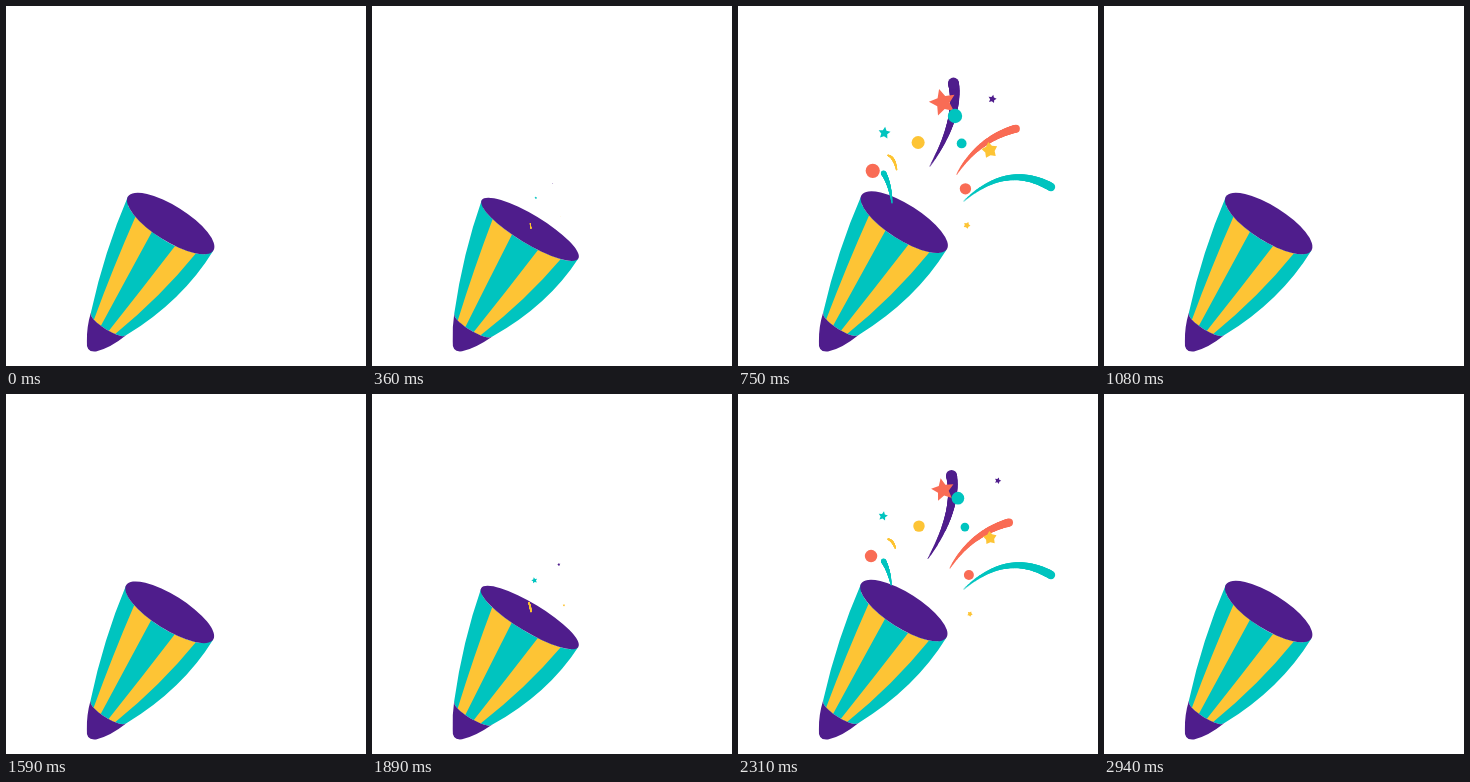
Recreate the animation shown at these times as an HTML page with a canvas. Size 360 by 360 pixels, loop 2.97 s.

```html
<!DOCTYPE html>
<html>
<head>
<meta charset="utf-8">
<style>
html, body { margin: 0; height: 100%; overflow: hidden; background: #fff; }
canvas { display: block; width: 360px; height: 360px; }
</style>
</head>
<body>
<canvas id="stage" width="360" height="360"></canvas>
<script>
const ctx = document.getElementById('stage').getContext('2d');
const LOOP = 2970, POP = LOOP / 2;
const TEAL = '#00c4bf', YELLOW = '#fdc435', RED = '#f96c55', PURPLE = '#4f1d8c';

const clamp = x => Math.max(0, Math.min(1, x));
const span = (t, a, b) => clamp((t - a) / (b - a));
const smooth = k => k * k * (3 - 2 * k);
const mix = (a, b, k) => a + (b - a) * k;

// Confetti: where it ends, radius, colour, and timing in ms
const bits = [
  { x: 145, y: 122, r: 7, c: TEAL, star: .5, from: [165, 196], born: 325, gone: 970, spin: .2 },
  { x: 260, y: 86.5, r: 4.8, c: PURPLE, star: .5, from: [176, 183], born: 345, gone: 980, spin: .3 },
  { x: 232, y: 220, r: 4, c: YELLOW, star: .6, from: [186, 210], born: 350, gone: 970, spin: .5 },
  { x: 205, y: 96, r: 15, c: RED, star: .48, stop: 770, gone: 1040, spin: -.2 },
  { x: 252, y: 144, r: 9, c: YELLOW, star: .6, stop: 770, gone: 1030, spin: -.1 },
  { x: 181, y: 132, r: 6.9, c: YELLOW },
  { x: 133, y: 162, r: 7.5, c: RED },
  { x: 220, y: 104, r: 7.6, c: TEAL },
  { x: 227, y: 133, r: 5.2, c: TEAL },
  { x: 231, y: 181, r: 6, c: RED }
];

// Streamers: curve from tail to head, head radius, drift vector
const streamers = [
  { p: [192, 160, 222, 112, 215.5, 77], r: 5.5, c: PURPLE, go: [2, -4.5], born: 455, out: 835 },
  { p: [219, 168, 240, 133, 278, 122.5], r: 4, c: RED, go: [7, -6], born: 430, out: 835 },
  { p: [226, 195, 269, 156, 313, 181], r: 4.2, c: TEAL, go: [0, 0], born: 412, out: 835 },
  { p: [154, 197, 152, 178, 145.5, 167], r: 2.6, c: TEAL, go: [0, 0], born: 450, out: 780 },
  { p: [159, 162, 157, 147, 150, 145], r: 1.2, c: YELLOW, go: [0, 0], born: 320, full: 560, out: 720, rise: 64 }
];

function disc(x, y, r) {
  ctx.beginPath();
  ctx.arc(x, y, r, 0, 7);
  ctx.fill();
}

function star(x, y, r, inner, turn) {
  ctx.beginPath();
  for (let i = 0; i < 10; i++) {
    const a = turn + i * Math.PI / 5, d = i % 2 ? r * inner : r;
    ctx.lineTo(x + d * Math.sin(a), y - d * Math.cos(a));
  }
  ctx.fill();
}

function drawBit(b, t) {
  const { born = 420, gone = 1080, stop = 840 } = b;
  const from = b.from || [mix(165, b.x, .2), mix(215, b.y, .2)];
  const s = smooth(span(t, 280, stop));
  const r = b.r * span(t, born, born + 180) * (1 - span(t, 650, gone) ** 2);
  if (r <= 0) return;
  const x = mix(from[0], b.x, s), y = mix(from[1], b.y, s);
  ctx.fillStyle = b.c;
  if (b.star) star(x, y, r, b.star, b.spin + .001 * (t - 825));
  else disc(x, y, r);
}

function drawStreamer(s, t) {
  const head = span(t, s.born, s.full || 750), tail = span(t, s.out, 1065);
  if (!head || tail >= 1) return;
  const k = (t - 750) / 75;
  const push = k < 0 ? -6 * (1 - head) : k < 2 ? -Math.sin(k * Math.PI / 2) : (k - 2) * Math.PI / 2;
  const dx = s.go[0] * push;
  const dy = s.go[1] * push + (s.rise || 0) * (1 - smooth(span(t, 280, 840)));
  const [x0, y0, x1, y1, x2, y2] = s.p;
  const size = s.r * Math.min(1, head * 2) * (1 - tail ** 2 * .7);
  ctx.fillStyle = s.c;
  for (let i = 0; i <= 90; i++) {
    const u = i / 90, q = mix(tail, 1, u) * head, n = 1 - q;
    const taper = s.rise ? Math.sin(Math.PI * mix(.1, .9, u)) : u ** .8;
    disc(n * n * x0 + 2 * n * q * x1 + q * q * x2 + dx,
         n * n * y0 + 2 * n * q * y1 + q * q * y2 + dy,
         mix(.5, size, taper));
  }
}

// 0 is rest, 1 is squashed, below 0 is stretched
function squash(t) {
  if (t < 382) return 1.12 * (t / 382) ** 1.6;
  if (t < 600) return mix(1.12, -.3, smooth(span(t, 382, 600)));
  return -.3 * (1 - smooth(span(t, 600, 1110)));
}

function drawCone(q) {
  const widen = Math.max(0, q);
  const top = 149.5 * (1 - .055 * q), low = 31.5 * (1 - .05 * q);
  const wide = 50.5 * (1 + .115 * widen), thin = 17.5 - 3.2 * widen;
  const neck = 21 * (1 + .06 * widen), sag = 6;
  const rim = f => [f * wide, top - thin * Math.sqrt(1 - f * f)];
  const seam = f => [1 + f * neck, low - sag * Math.sqrt(1 - f * f)];
  // Slice of the cone between two edges, given as fractions at rim and seam
  const slice = (f1, g1, f2, g2, color) => {
    const bend = (f, g) => {
      const a = rim(f), b = seam(g);
      return [(a[0] + b[0]) / 2 + (f > 0 ? 15 : 6) * f ** 3, (a[1] + b[1]) / 2];
    };
    ctx.fillStyle = color;
    ctx.beginPath();
    ctx.moveTo(...rim(f1));
    ctx.quadraticCurveTo(...bend(f1, g1), ...seam(g1));
    for (let i = 1; i <= 20; i++) ctx.lineTo(...seam(mix(g1, g2, i / 20)));
    ctx.quadraticCurveTo(...bend(f2, g2), ...rim(f2));
    for (let i = 1; i <= 20; i++) ctx.lineTo(...rim(mix(f2, f1, i / 20)));
    ctx.fill();
  };

  ctx.save();
  ctx.translate(85, 344);
  ctx.rotate((32.2 - q) * Math.PI / 180);
  ctx.scale(1, -1);

  slice(-1, -1, 1, 1, TEAL);
  slice(-.66, -.7, -.225, -.26, YELLOW);
  slice(.31, .18, .74, .52, YELLOW);

  ctx.fillStyle = PURPLE;
  ctx.beginPath();
  ctx.moveTo(...seam(-1));
  ctx.quadraticCurveTo(-16, 17, -8, 5);
  ctx.quadraticCurveTo(-3, -5, 5, 1.5);
  ctx.quadraticCurveTo(15, 11, ...seam(1));
  for (let i = 1; i <= 20; i++) ctx.lineTo(...seam(1 - i / 10));
  ctx.fill();

  ctx.beginPath();
  ctx.ellipse(0, top, wide, thin, 0, 0, 7);
  ctx.fill();
  ctx.restore();
}

function frame() {
  const t = performance.now() % LOOP % POP;
  ctx.clearRect(0, 0, 360, 360);
  drawCone(squash(t));
  streamers.forEach(s => drawStreamer(s, t));
  bits.forEach(b => drawBit(b, t));
  requestAnimationFrame(frame);
}
frame();
</script>
</body>
</html>
```
